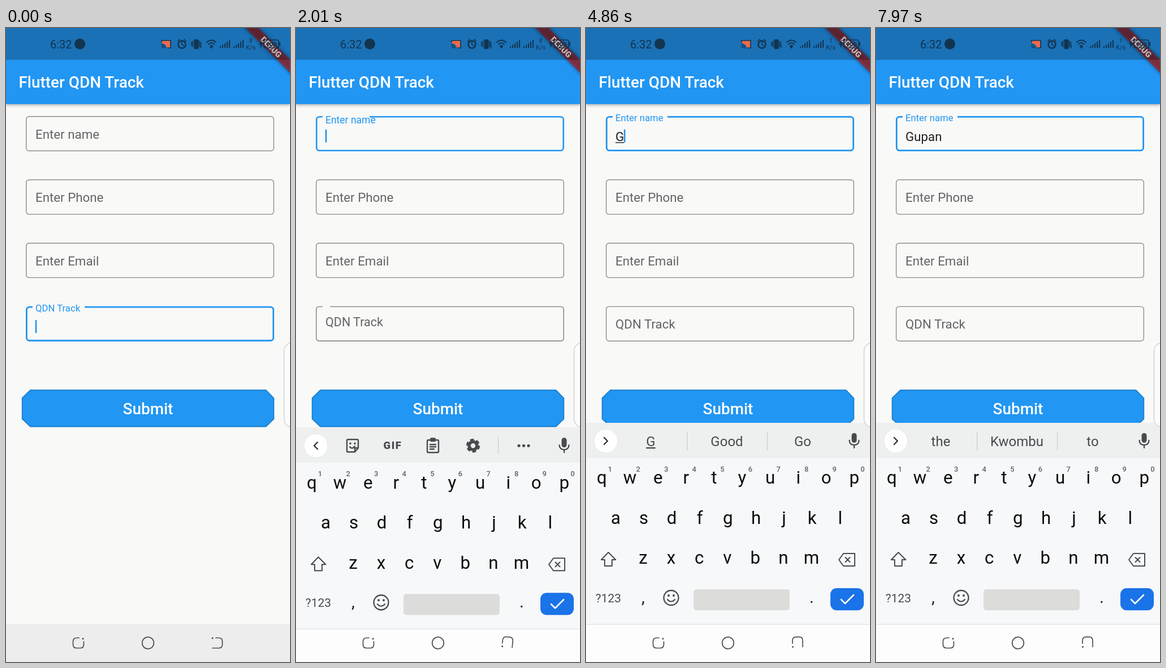
An HTML page for the animation above (7.99 s loop, 502 by 1116 pixels).

```html
<!DOCTYPE html>
<html lang="en">
<head>
<meta charset="utf-8">
<title>Form entry</title>
<style>
html, body { margin: 0; width: 100%; height: 100%; overflow: hidden; background: #f9f9f8 }
svg { display: block; width: 502px; height: 1116px; font-family: Roboto, sans-serif }
text { white-space: pre }
.line { fill: none; stroke-linecap: round; stroke-linejoin: round }
</style>
</head>
<body>
<svg viewBox="0 0 502 1116">
  <defs>
    <filter id="soft" x="-20%" y="-20%" width="140%" height="150%"><feDropShadow dx="0" dy="2" stdDeviation="2.5" flood-opacity=".3"/></filter>
    <filter id="blur" x="-30%" y="-60%" width="160%" height="220%"><feGaussianBlur stdDeviation="3"/></filter>
  </defs>
  <rect width="502" height="1116" fill="#f9f9f8"/>
  <g id="form"></g>
  <path d="M43 637.500H459.500L473.300 651.500V688L459.500 701.500H43L28.700 688V651.500Z" fill="#2196f3" stroke="#1c80d0" stroke-width="1.800"/>
  <text x="251" y="680" font-size="27.900" font-weight="500" fill="#fff" text-anchor="middle">Submit</text>
  <rect y="1049" width="502" height="67" fill="#ededed"/>
  <g id="keyboard"></g>
  <rect x="491.500" y="554" width="40" height="149" rx="15" fill="#fcfcfc" stroke="#dcdcdc" stroke-width="2"/>
  <g class="line" stroke="#4e4e4e" stroke-width="1.700">
    <path d="M129 1073.500H125Q118.500 1073.500 118.500 1080V1085Q118.500 1091.500 125 1091.500H131Q137.500 1091.500 137.500 1085V1080"/>
    <circle cx="136" cy="1075" r=".7"/>
    <circle cx="251" cy="1082.500" r="10.300"/>
    <g id="back"><path d="M371 1073.500H376Q382.500 1073.500 382.500 1080V1085Q382.500 1091.500 376 1091.500H365"/><circle cx="365" cy="1074" r=".7"/></g>
  </g>
  <rect width="502" height="134" fill="#2196f3" filter="url(#soft)"/>
  <text x="22.500" y="105" font-size="27.900" font-weight="500" fill="#fff">Flutter QDN Track</text>
  <g transform="translate(502 0) rotate(45)">
    <rect x="-80" y="39" width="160" height="16.700" opacity=".5" filter="url(#blur)"/>
    <rect x="-80" y="39" width="160" height="16.700" fill="#b71c1c" fill-opacity=".63"/>
    <text y="52.300" font-size="14.200" font-weight="900" fill="#fff" text-anchor="middle">DEBUG</text>
  </g>
  <rect width="502" height="56" fill-opacity=".25"/>
  <g fill="#12344f" stroke="#12344f" stroke-width="0">
    <text x="78" y="36" font-size="20">6:32</text>
    <circle cx="130.500" cy="28" r="9.500"/>
    <path d="M275 22H291V35H285A10 10 0 0 0 275 27Z" fill="#f0694a"/>
    <g class="line" stroke-width="1.700">
      <path d="M275 25V22H291V35H286M275 29A6 6 0 0 1 281 35M275 32.500A3 3 0 0 1 278 35"/>
      <path d="M311 24V29L314 31M304 23L307 20M318 23L315 20"/>
      <circle cx="311" cy="29" r="6.500" stroke-width="2.500"/>
      <path d="M328 25V31M330.500 23V33M344.500 25V35M342 23V33"/>
      <path d="M355 25Q363 18 371 25M358 28.500Q363 24 368 28.500M361 32Q363 30 365 32" stroke-width="2"/>
      <rect x="456" y="21" width="26" height="14" rx="3"/>
    </g>
    <rect x="332.500" y="20" width="8" height="17" rx="1.500"/>
    <circle cx="363" cy="34" r="2"/>
    <path id="bars" d="M378 32h2v3h-2zM382 29.500h2v5.500h-2zM386 27h2v8h-2zM390 24h2v11h-2zM394 21h2v14h-2z"/>
    <use href="#bars" x="24"/>
    <text id="rate" x="432.500" y="26" font-size="11" text-anchor="middle"></text>
    <text x="432.500" y="38" font-size="11" text-anchor="middle">K/s</text>
    <path d="M452 20L447 29H450L449 36L455 26H451Z"/>
    <text x="469" y="32.500" font-size="11" font-weight="700" text-anchor="middle">100</text>
    <rect x="483" y="25" width="2" height="6"/>
  </g>
</svg>
<script>
const LOOP = 7990, BLUE = '#2196f3';
const $ = id => document.getElementById(id);
const clamp = x => Math.max(0, Math.min(1, x));
const ease = x => 1 - (1 - clamp(x)) ** 3;
const during = (t, a, b) => t >= a && t < b;
// Value of the last [time, value] step already reached
const at = (t, steps) => steps.filter(s => s[0] <= t).pop()[1];

const text = (x, y, size, str, fill, more = '') =>
  `<text x="${x}" y="${y}" font-size="${size}" fill="${fill}" ${more}>${str}</text>`;
const mid = (x, y, size, str, fill, more = '') => text(x, y, size, str, fill, 'text-anchor="middle" ' + more);
const box = (x, y, w, h, r, fill, more = '') =>
  `<rect x="${x}" y="${y}" width="${w}" height="${h}" rx="${r}" fill="${fill}" ${more}/>`;
const line = (d, color, width) => `<path class="line" d="${d}" stroke="${color}" stroke-width="${width}"/>`;
const circle = (x, y, r, fill, more = '') => `<circle cx="${x}" cy="${y}" r="${r}" fill="${fill}" ${more}/>`;

const typed = [[0, ''], [4360, 'G'], [4880, 'Gu'], [5160, 'Gup'], [5400, 'Gupa'], [6810, 'Gupan']];
const carets = [[0, 'track'], [630, ''], [1900, 'name'], [2370, ''], [3460, 'name'], [3920, ''],
  [4360, 'name'], [6000, ''], [6220, 'name'], [7870, '']];
const words = [[0, null], [4380, ['G', 'Good', 'Go']], [4900, ['Gu', 'Guy', 'Guess']],
  [5160, ['Gup', 'Guppy', 'Gulp']], [5240, ['Gupa', 'Gupan', 'Gulp']],
  [6550, ['Gupan', 'Gupans', 'Gulping']], [6990, ['the', 'Kwombu', 'to']]];
const presses = [[4080, 4260, 'G'], [4620, 4860, 'u'], [4980, 5120, 'p'], [5220, 5400, 'a'], [6490, 6650, 'n']];
const COMMIT = 6990;

// Letter widths in em, enough to place the caret after the typed text
const EM = { G: .681, u: .551, p: .561, a: .544, n: .552 };
const textWidth = str => [...str].reduce((sum, c) => sum + EM[c] * 22.3, 0);

function field(row, label, focus, gap) {
  const y = 155 + 111.55 * row, w = 1.4 + 1.4 * focus, i = w / 2;
  const color = focus > .5 ? BLUE : '#8d8d8a';
  return box(35 + i, y + i, 439 - w, 62 - w, 5, 'none', `stroke="${color}" stroke-width="${w}"`) +
    (focus ? box(47, y - 1, gap * focus, 6, 0, '#f9f9f8') : '') +
    text(52, y + 39.5 - 30.5 * focus, 22.3 - 5.6 * focus, label, focus > .5 ? BLUE : '#646464');
}

function drawForm(t) {
  const move = ease((t - 1930) / 170), str = at(t, typed), caret = at(t, carets);
  const end = 52 + textWidth(str);
  let out = field(0, 'Enter name', move, 97) + field(1, 'Enter Phone', 0) +
    field(2, 'Enter Email', 0) + field(3, 'QDN Track', 1 - move, 92);
  out += text(52, 199, 22.3, str, '#212121');
  if (str && t < COMMIT) out += box(52, 201, end - 52, 1.4, 0, '#212121');
  if (caret) out += box(end - .3, caret == 'name' ? 178.5 : 514, 2.7, 23, 1, BLUE);
  return out;
}

const rows = ['qwertyuiop', 'asdfghjkl', 'zxcvbnm'];
const starts = [28, 52.5, 101], bases = [802.4, 872.6, 943.3];
const keys = rows.flatMap((row, r) => [...row].map((c, i) =>
  ({ c, x: starts[r] + 49.6 * i, y: bases[r], hint: r ? '' : (i + 1) % 10 })));

const dark = '#484b4e';
const tools =
  line('M92 716H108Q110 716 110 718V731L104 738H92Q90 738 90 736V718Q90 716 92 716ZM104 738V731H110M95 729Q99 734 104 728', dark, 2.4) +
  circle(96, 723, 1.8, dark) + circle(104, 723, 1.8, dark) +
  mid(171, 733, 18.5, 'GIF', dark, 'font-weight="900" letter-spacing="1.5"') +
  line('M234 717H250Q252 717 252 719V737Q252 739 250 739H234Q232 739 232 737V719Q232 717 234 717ZM237 725H247M237 729H247M237 733H244', dark, 2.4) +
  box(237, 713, 10, 7, 2, dark) +
  circle(313, 727, 7, 'none', `stroke="${dark}" stroke-width="5.6"`) +
  circle(313, 727, 10.5, 'none', `stroke="${dark}" stroke-width="3.4" stroke-dasharray="6.6 4.4"`) +
  box(357, 712, 1.2, 30, 0, '#c9cccd') +
  [394, 402.5, 411].map(x => circle(x, 727, 2.6, dark)).join('');

const fixedKeys =
  box(0, 695, 502, 421, 0, '#f7f8f9') + box(0, 695, 502, 62, 0, '#eef0f0') +
  box(0, 1049, 502, 67, 0, '#fdfdfd') + box(0, 1049, 502, 1.2, 0, '#dde0ea') +
  circle(35, 727, 21, '#fff', 'stroke="#e6e8e9"') +
  box(469.5, 713, 9, 17, 4.5, dark) +
  line('M465.500 726Q466 734 474 734T482.500 726M474 734V739', dark, 2.3) +
  line('M455 925H475V947H455L447 936ZM458.500 932L466.500 940M466.500 932L458.500 940', dark, 2) +
  mid(39.5, 1011, 21, '?123', dark) + mid(101, 1012, 30, ',', '#222') + mid(399, 1012, 30, '.', '#222') +
  circle(150.5, 1003, 13, 'none', `stroke="${dark}" stroke-width="2.3"`) +
  circle(146, 999, 2, dark) + circle(155, 999, 2, dark) + line('M144 1006Q150.500 1013 157 1006', dark, 2.2) +
  box(190, 988, 170, 37, 5, '#dcdcdb') + box(432, 986, 59, 39, 11, '#1a73e8') +
  line('M451 1006L458 1013L473 998', '#fff', 2.6);

function suggestions(list, t) {
  const literal = t < COMMIT;
  return box(178, 710, 1.2, 34, 0, '#c9cccd') + box(320, 710, 1.2, 34, 0, '#c9cccd') +
    list.map((w, i) => mid([114.5, 249, 383][i], 736, 24, w, dark,
      literal && !i ? 'text-decoration="underline"' : '')).join('');
}

function popup(c) {
  const { x, y } = keys.find(k => k.c == c.toLowerCase());
  return box(x - 27, y - 135.5, 54, 157, 6, '#eceff0', 'filter="url(#soft)"') +
    mid(x, y - 82.5, 36, c, '#111') + [-4, 0, 4].map(d => circle(x + 13.5 + d, y - 66.5, 1.2, '#333')).join('');
}

function drawKeys(t) {
  const list = at(t, words), caps = during(t, 3480, 4270);
  const press = presses.find(p => during(t, p[0], p[1]));
  return fixedKeys +
    line(list ? 'M32 721L38 727L32 733' : 'M38 721L32 727L38 733', '#333', 2.4) +
    (list ? suggestions(list, t) : tools) +
    keys.map(k => mid(k.x, k.y, 31.3, caps ? k.c.toUpperCase() : k.c, '#0c0c0c') +
      (k.hint === '' ? '' : mid(k.x + 14.5, k.y - 21.4, 13, k.hint, '#5f6368', 'font-weight="500"'))).join('') +
    `<path d="M39.500 923L52.500 936H46V947H33V936H27Z" fill="${caps ? dark : 'none'}" stroke="${dark}" stroke-width="2" stroke-linejoin="round"/>` +
    (press ? popup(press[2]) : '');
}

const board = $('keyboard');
function frame(now) {
  const t = now % LOOP, p = clamp((t - 1830) / 300), rise = ease(p);
  $('form').innerHTML = drawForm(t);
  board.innerHTML = p ? drawKeys(t) : '';
  board.setAttribute('transform', `translate(0 ${132 * (1 - rise)})`);
  board.setAttribute('opacity', clamp(p * 2.3));
  $('back').setAttribute('transform', `translate(0 ${-1.2 * rise}) rotate(${-90 * rise} 373.5 1082)`);
  $('rate').textContent = t < 3460 ? 8 : 1;
  requestAnimationFrame(frame);
}
frame(performance.now());
</script>
</body>
</html>
```
